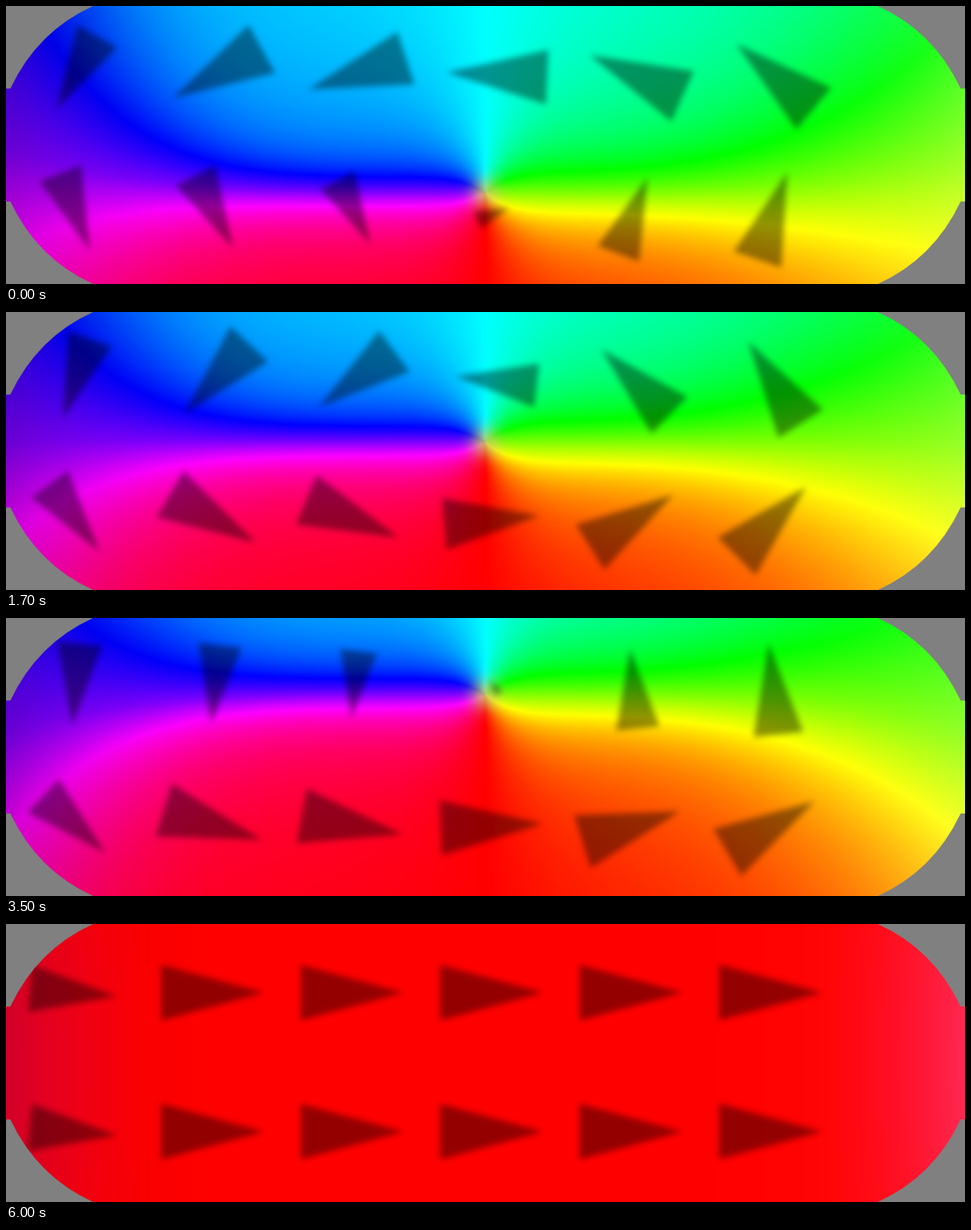
Animation, 1100 px wide and 320 px high, one loop 6.1 s. Source, as an HTML page with a canvas:

```html
<!DOCTYPE html>
<html lang="en">
<head>
<meta charset="utf-8">
<title>Vortex leaving a strip</title>
<style>
html, body { margin: 0; width: 100%; height: 100%; overflow: hidden; background: #808080; }
canvas { display: block; width: 1100px; height: 320px; }
</style>
</head>
<body>
<canvas id="stage" width="1100" height="320"></canvas>
<script>
const W = 1100, H = 320, STEP = 2, LOOP = 6100, TICK = 100;
const CELL = 160, COLS = 6, ROWS = 2, MID = 550;
const COLUMNS = W / STEP, LINES = H / STEP, DEG = 180 / Math.PI;
const ctx = document.getElementById('stage').getContext('2d');
const map = document.createElement('canvas');
map.width = COLUMNS;
map.height = LINES;
const mapCtx = map.getContext('2d');
const image = mapCtx.createImageData(COLUMNS, LINES);

// Height of the vortex core over time
const corePath = [
  [0, 215], [700, 190], [1700, 150], [2600, 115], [3500, 88],
  [3900, 67], [4100, 45], [4300, -10], [4500, -120], [4800, -500], [LOOP, -700]
];

const clamp = (v, lo = 0, hi = 1) => Math.min(hi, Math.max(lo, v));
const smooth = v => { v = clamp(v); return v * v * (3 - 2 * v); };

function coreAt(t) {
  const i = corePath.findIndex(p => p[0] > t);
  const [t0, y0] = corePath[i - 1], [t1, y1] = corePath[i];
  return y0 + (y1 - y0) * (t - t0) / (t1 - t0);
}

function inside(x, y) {
  const dx = x < MID ? 160 - x : x - 940;
  return dx < 0 || Math.hypot(dx, y - 161) < 169;
}

// Direction in degrees, counter-clockwise from the right
function direction(x, y, s) {
  const u = x - MID, r = Math.abs(u), left = u < 0;
  const wall = s.core + (110 - 0.75 * s.core) * (r / MID) ** 4;
  const v = y - wall, d = Math.min(Math.abs(v), 220), above = v < 0;
  const spread = 110 * (r / 450) ** (left ? 5 : 3) * (above ? 1.1 : left ? 0.6 : 0.85);
  const base = left ? (above ? 30 + 0.1 * d : 28) : (above ? 41 + 0.07 * d : 41);
  const fan = 28 + 0.5 * d;
  let a = 90 + Math.atan2(-v, (base + spread) * Math.tanh(u / fan)) * DEG;
  if (a > 180) a -= 360;
  const end = clamp((r - 385) / 165) * (1 - 0.35 * ((y - 160) / 160) ** 2);
  return a + (-s.bend * end - a) * s.settled;
}

const channel = (h, n) => 255 * clamp(Math.abs((h / 60 + n) % 6 - 3) - 1);

function paint(s, sums) {
  const px = image.data;
  for (let j = 0, k = 0; j < LINES; j++) {
    const y = (j + 0.5) * STEP;
    for (let i = 0; i < COLUMNS; i++, k += 4) {
      const x = (i + 0.5) * STEP, a = direction(x, y, s);
      const h = (a + 720) % 360;
      const tilt = ((x - MID) / MID) ** 6;
      const core = 0.8 * Math.exp(-((x - MID) ** 2 + (y - s.core) ** 2) / 300);
      const dark = x < MID ? 1 - 0.18 * tilt : 1;
      const light = x > MID ? 0.16 * tilt : 0;
      const tone = (n, c) => {
        const v = channel(h, n) * dark;
        const lit = v + (255 - v) * light;
        return lit + (c - lit) * core;
      };
      px[k] = tone(0, 205);
      px[k + 1] = tone(4, 205);
      px[k + 2] = tone(2, 100);
      px[k + 3] = 255;
      const col = Math.floor(x / CELL);
      if (col < COLS && inside(x, y)) {
        const sum = sums[Math.floor(y / CELL) * COLS + col];
        sum.x += Math.cos(a / DEG);
        sum.y -= Math.sin(a / DEG);
      }
    }
  }
  mapCtx.putImageData(image, 0, 0);
}

// Each arrow is the mean direction of its cell, shorter where directions cancel
function arrow(sum, i) {
  const size = Math.hypot(sum.x, sum.y) / (CELL / STEP) ** 2;
  ctx.save();
  ctx.translate((i % COLS + 0.5) * CELL, (Math.floor(i / COLS) + 0.5) * CELL - 1);
  ctx.rotate(Math.atan2(sum.y, sum.x));
  ctx.scale(size, size);
  ctx.beginPath();
  ctx.moveTo(56, 0);
  ctx.lineTo(-62, -32);
  ctx.lineTo(-62, 32);
  ctx.fill();
  ctx.restore();
}

function corner(sx, sy) {
  ctx.save();
  ctx.translate(sx < 0 ? W : 0, sy < 0 ? H : 0);
  ctx.scale(sx, sy);
  ctx.beginPath();
  ctx.moveTo(0, 0);
  ctx.lineTo(100, 0);
  ctx.quadraticCurveTo(36, 29, 5, 95);
  ctx.lineTo(0, 95);
  ctx.fill();
  ctx.restore();
}

function draw(t) {
  const state = {
    core: coreAt(t),
    settled: smooth((t - 4200) / 400),
    bend: 40 * Math.exp(-Math.max(0, t - 4600) / 1150)
  };
  const sums = Array.from({ length: COLS * ROWS }, () => ({ x: 0, y: 0 }));
  paint(state, sums);
  ctx.drawImage(map, 0, 0, W, H);
  ctx.fillStyle = 'rgba(0,0,0,0.42)';
  ctx.filter = 'blur(3.5px)';
  sums.forEach(arrow);
  ctx.filter = 'none';
  ctx.fillStyle = '#808080';
  for (const sx of [1, -1]) for (const sy of [1, -1]) corner(sx, sy);
}

const start = performance.now();
let shown = -1;
function frame() {
  const t = Math.floor((performance.now() - start) % LOOP / TICK) * TICK;
  if (t !== shown) draw(shown = t);
  requestAnimationFrame(frame);
}
frame();
</script>
</body>
</html>
```
